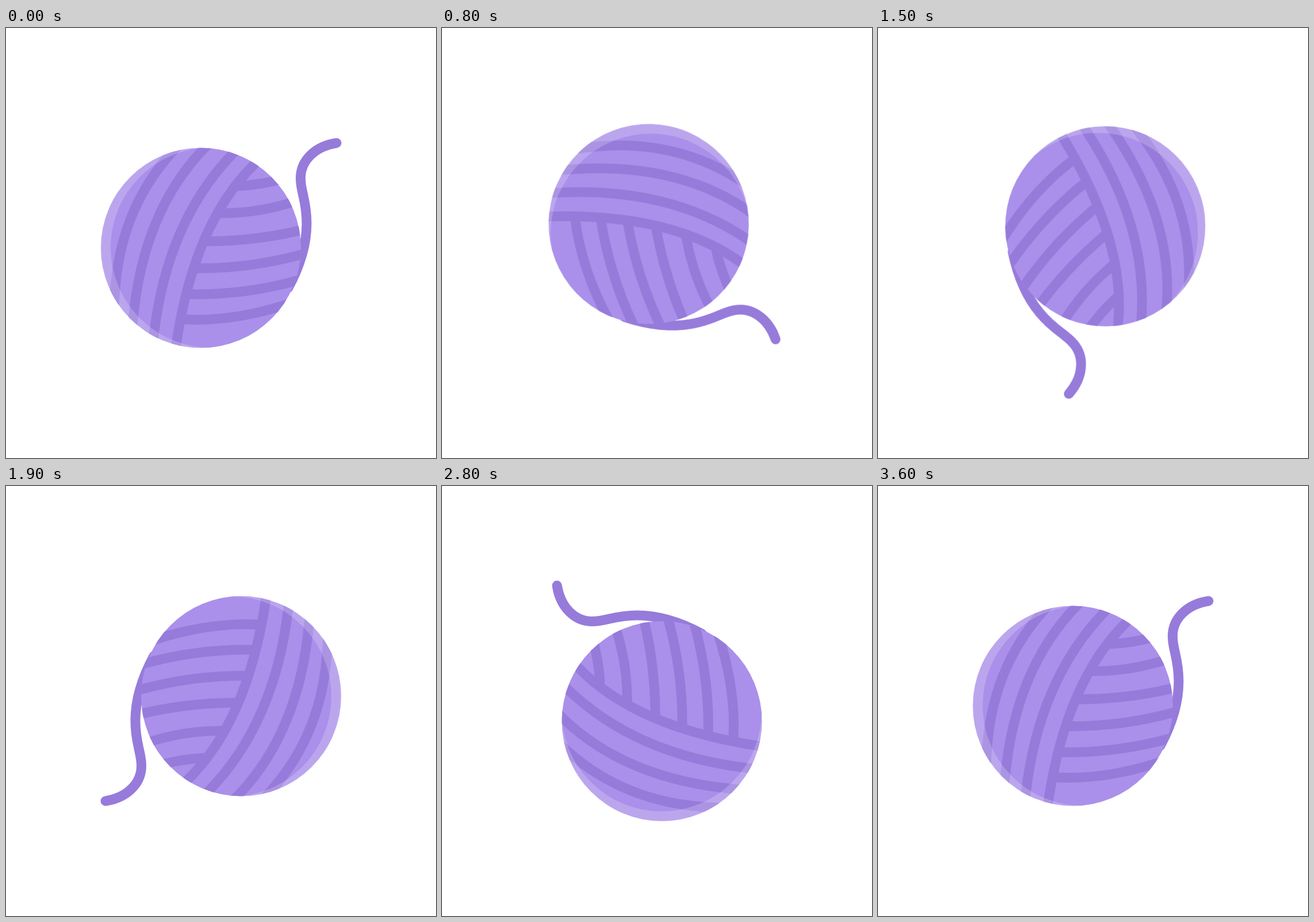
Animation, 748 px wide and 748 px high, one loop 3.7 s. Source, as an HTML page:

```html
<!DOCTYPE html>
<html lang="en">
<head>
<meta charset="utf-8">
<title>Rolling yarn ball</title>
<style>
  html, body { margin: 0; width: 100%; height: 100%; overflow: hidden; background: #fff; }
  svg { display: block; width: 100vw; height: 100vh; }
  .yarn { fill: none; stroke: #967bdb; stroke-width: 17; stroke-linecap: square; }
  .tail { stroke-linecap: round; stroke-linejoin: round; }
  .roll {
    transform-origin: 374px 374px;
    /* small lead keeps each step ahead of its 100 ms mark */
    animation: roll 3700ms -4ms infinite;
  }
  /* one step per 100 ms, slower after 1200 ms and faster at the end */
  @keyframes roll {
    0%        { transform: rotate(0deg);   animation-timing-function: steps(12, end); }
    32.43243% { transform: rotate(120deg); animation-timing-function: steps(3, end); }
    40.54054% { transform: rotate(140deg); animation-timing-function: steps(15, end); }
    81.08108% { transform: rotate(290deg); animation-timing-function: steps(6, end); }
    97.29730%, 100% { transform: rotate(360deg); }
  }
</style>
</head>
<body>
<svg viewBox="0 0 748 748">
  <defs>
    <clipPath id="ball"><circle cx="339" cy="382.5" r="174"/></clipPath>
    <mask id="crescent">
      <rect width="748" height="748" fill="#fff"/>
      <circle cx="356" cy="382" r="174" fill="#000"/>
    </mask>
  </defs>
  <g class="roll">
    <path class="yarn tail" d="M575 200C536 206 512 232 512.5 262C512.5 285 523 300 523 340C523 378 511 415 491 452"/>
    <circle cx="339" cy="382.5" r="174" fill="#aa90ea"/>
    <g clip-path="url(#ball)">
      <g class="yarn">
        <path d="M296 208L287 218Q196 320 189 468L188 486"/>
        <path d="M354 200L345 209Q238 320 221 508L219 522"/>
        <path d="M403 210L395 218Q280 337 257 535L255 549"/>
        <path d="M441 228L433 236Q328 338 296 550L295 560"/>
      </g>
      <g class="yarn">
        <path d="M408 274.500Q442 273 483 262"/>
        <path d="M380 322Q440 322 505 301"/>
        <path d="M355 371Q440 370 520 350"/>
        <path d="M336 418Q430 418 521 392"/>
        <path d="M322 463Q415 465 512 438"/>
        <path d="M312 507Q395 511 488 481"/>
      </g>
    </g>
    <circle cx="339" cy="382.5" r="174" fill="#fff" fill-opacity=".2" mask="url(#crescent)"/>
  </g>
</svg>
</body>
</html>
```
